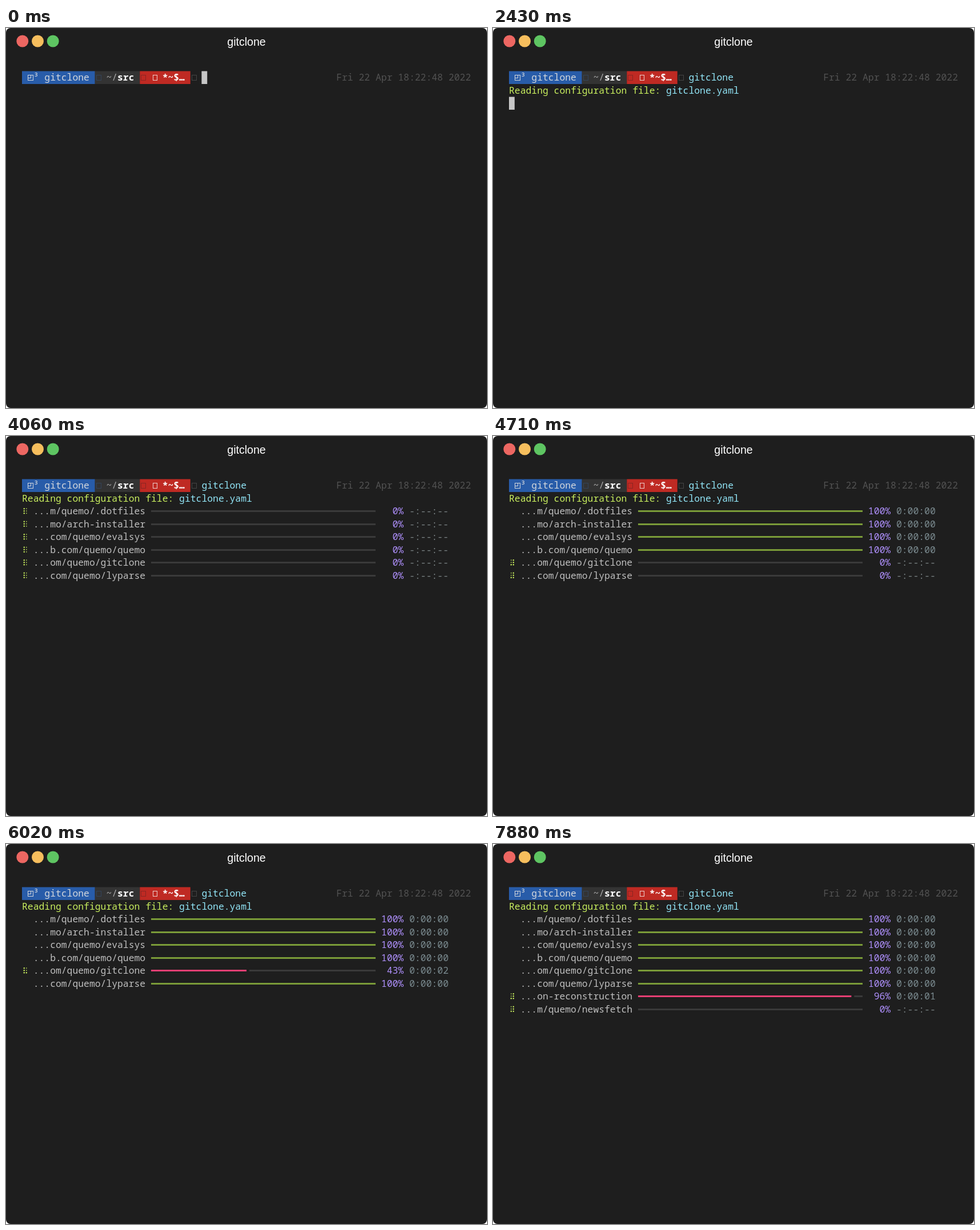
Recreate the animation shown at these times as an HTML page with a canvas. Size 842 by 665 pixels, loop 8000 ms.

```html
<!DOCTYPE html>
<html lang="en">
<head>
<meta charset="utf-8">
<title>gitclone</title>
<style>
html, body { margin: 0; width: 100%; height: 100%; overflow: hidden; background: #fff; }
canvas { display: block; }
</style>
</head>
<body>
<canvas id="stage" width="842" height="665"></canvas>
<script>
const ctx = document.getElementById('stage').getContext('2d');
const LOOP = 8000, LEFT = 28, TOP = 75.5, CELL = 9.825, LINE = 22.5;
const MONO = '16.375px "Noto Sans Mono", "DejaVu Sans Mono", monospace';
const LIME = '#c8ee5e', CYAN = '#92e6f8', NONE = '-:--:--', DONE = '0:00:00';
const typedAt = [100, 215, 330, 600, 710, 880, 1090, 1240];
const ENTER = 2180, READ = 2430, CLONE = 3120;

// Each step: [time, percent, remaining]; the row appears with its first step.
const jobs = [
  ['...m/quemo/.dotfiles', [[3120, 0, NONE], [4380, 100, DONE]]],
  ['...mo/arch-installer', [[3120, 0, NONE], [4490, 100, DONE]]],
  ['...com/quemo/evalsys', [[3120, 0, NONE], [4490, 100, DONE]]],
  ['...b.com/quemo/quemo', [[3120, 0, NONE], [4600, 100, DONE]]],
  ['...om/quemo/gitclone', [[3330, 0, NONE], [4820, 12, '0:00:04'], [5040, 30, '0:00:02'],
    [5260, 41.3, '0:00:01'], [5590, 42, '0:00:02'], [5910, 43, '0:00:02'], [6230, 100, DONE]]],
  ['...com/quemo/lyparse', [[3530, 0, NONE], [5150, 10, '0:00:05'], [5480, 100, DONE]]],
  ['...on-reconstruction', [[6330, 0, NONE], [7100, 1, NONE], [7420, 30, '0:00:03'],
    [7540, 58, '0:00:02'], [7650, 77, '0:00:01'], [7770, 90, '0:00:01'], [7880, 96, '0:00:01']]],
  ['...m/quemo/newsfetch', [[6440, 0, NONE]]],
];
const spinner = [...'⠋⠙⠹⠸⠼⠴⠦⠧⠇⠏'].map(c => c.charCodeAt(0) - 0x2800);

const colX = col => LEFT + col * CELL;
const rowY = row => TOP + row * LINE;

function rect(x, y, w, h, color) {
  ctx.fillStyle = color;
  ctx.fillRect(x, y, w, h);
}

function dot(x, y, r, color) {
  ctx.fillStyle = color;
  ctx.beginPath();
  ctx.arc(x, y, r, 0, 7);
  ctx.fill();
}

function text(col, row, string, color, weight = 500) {
  ctx.font = `${weight} ${MONO}`;
  ctx.textAlign = 'left';
  ctx.fillStyle = color;
  const baseline = Math.round(rowY(row) + 16.5);
  [...string].forEach((ch, i) => ctx.fillText(ch, colX(col + i), baseline));
}

function cells(col, row, count, color) {
  rect(colX(col), rowY(row), count * CELL, LINE, color);
}

function box(x, y, w, h, color) {
  ctx.strokeStyle = color;
  ctx.lineWidth = 1;
  ctx.strokeRect(x + .5, y + .5, w, h);
}

function drawWindow() {
  ctx.clearRect(0, 0, 842, 665);
  ctx.fillStyle = '#1e1e1e';
  ctx.beginPath();
  ctx.roundRect(0, 0, 842, 665, 8);
  ctx.fill();
  ['#ed6762', '#f6be5d', '#5ec562'].forEach((c, i) => dot(28.8 + 26.7 * i, 23, 10.5, c));
  ctx.font = '19.6px "Liberation Sans", Arial, sans-serif';
  ctx.textAlign = 'center';
  ctx.fillStyle = '#fff';
  ctx.fillText('gitclone', 421, 31);
}

function drawPrompt() {
  cells(0, 0, 13, '#285ca9');
  cells(13, 0, 8, '#333');
  cells(21, 0, 9, '#bf2a23');
  box(38, 82, 9, 9, '#d4d8dd');
  box(38, 82, 5, 5, '#d4d8dd');
  text(2, 0, '³ gitclone', '#d4d8dd');
  text(15, 0, '~/', '#a8a8a8');
  text(17, 0, 'src', '#fff', 700);
  text(25, 0, '*~$…', '#fff', 700);
  box(158, 82, 8, 9, '#34445a');
  box(236, 82, 8, 9, '#8a2521');
  box(257, 82, 7, 9, '#eccfcd');
  box(325, 82, 8, 9, '#444');
  text(56, 0, 'Fri 22 Apr 18:22:48 2022', '#525252');
}

function drawSpinner(row, t) {
  const bits = spinner[Math.floor((t - CLONE) / 107) % spinner.length];
  for (let i = 0; i < 6; i++) {
    const lit = bits >> i & 1;
    dot(31.8 + 4 * (i > 2), rowY(row) + 6.8 + 4 * (i % 3), lit ? 1.2 : .95, lit ? LIME : '#a3bf52');
  }
}

function drawBar(row, percent) {
  const x = colX(23), y = Math.round(rowY(row) + 9.5), half = CELL / 2;
  const filled = Math.floor(percent * .8), start = filled && filled + 1;
  if (start < 80) rect(x + start * half, y, (80 - start) * half, 3, '#3a3a3a');
  rect(x, y, filled * half, 3, percent === 100 ? '#7a9b38' : '#e63f73');
}

function drawJob([name, steps], index, t) {
  const step = steps.findLast(s => s[0] <= t);
  if (!step) return;
  const [, percent, remaining] = step, row = index + 2;
  if (percent < 100) drawSpinner(row, t);
  text(2, row, name, '#bfbfbf');
  drawBar(row, percent);
  text(64, row, (Math.round(percent) + '%').padStart(4), '#ae8ffb');
  text(69, row, remaining, remaining === NONE ? '#7a8284' : '#7b8b90');
}

function draw() {
  const t = performance.now() % LOOP;
  const typed = typedAt.filter(at => at <= t).length;
  drawWindow();
  drawPrompt();
  text(32, 0, 'gitclone'.slice(0, typed), CYAN);
  if (t >= READ) {
    text(0, 1, 'Reading configuration file:', LIME);
    text(28, 1, 'gitclone.yaml', CYAN);
  }
  if (t < ENTER) cells(32 + typed, 0, 1, '#c7c7c7');
  else if (t < CLONE) cells(0, t < READ ? 1 : 2, 1, '#c7c7c7');
  jobs.forEach((job, i) => drawJob(job, i, t));
  requestAnimationFrame(draw);
}
draw();
</script>
</body>
</html>
```
